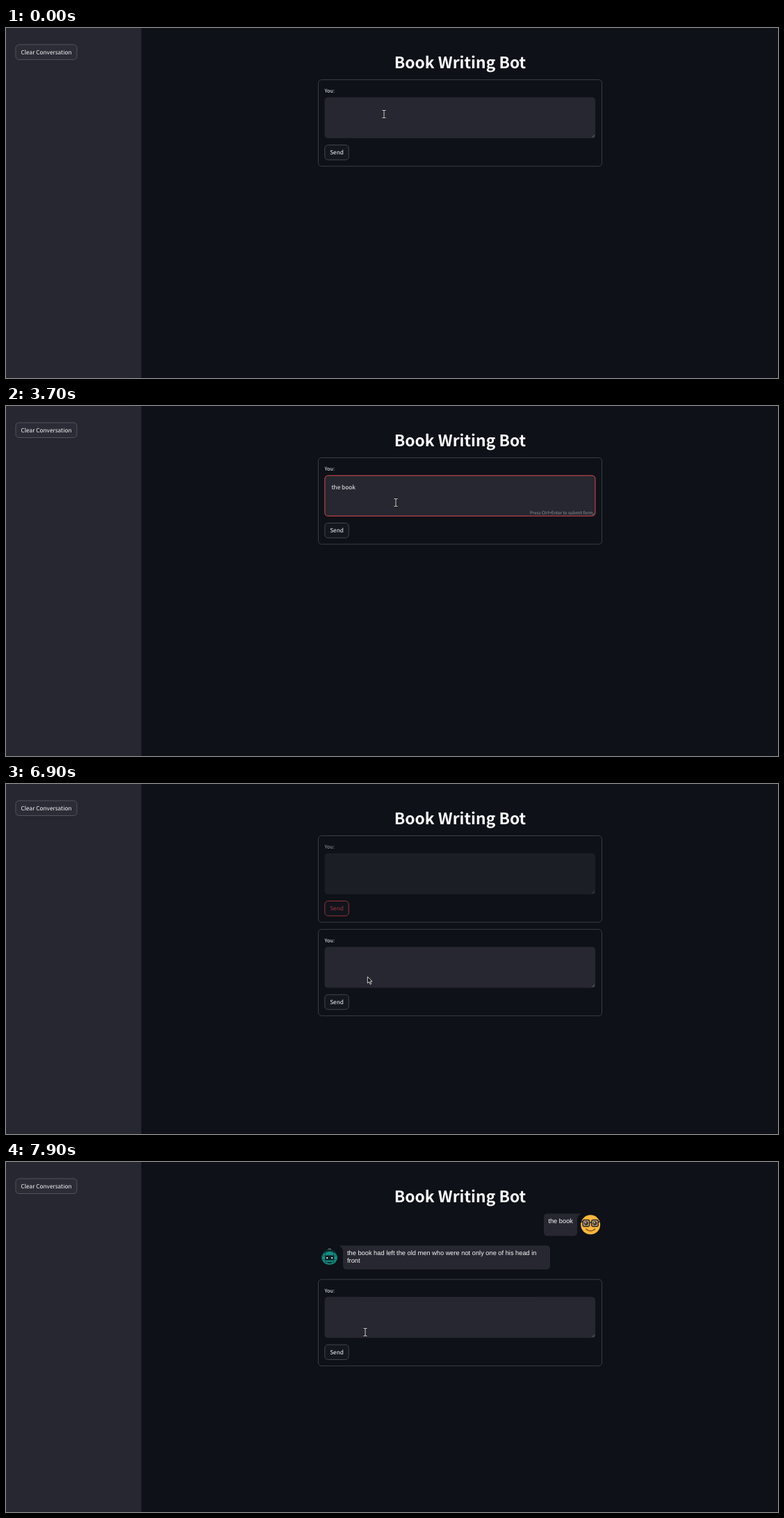
These frames come from a looping animation (1111x504 px, 8 s). An HTML page:

```html
<!DOCTYPE html>
<html lang="en">
<head>
<meta charset="utf-8">
<title>Book Writing Bot</title>
<style>
html, body { margin: 0; width: 100%; height: 100%; overflow: hidden; background: #0e1117; }
svg { display: block; width: 1111px; height: 504px; }
text { font: 8.29px "Noto Sans CJK JP", "Noto Sans CJK SC", "Noto Sans CJK", sans-serif; fill: #fafafa; text-rendering: geometricPrecision; }
.title { font-size: 22.8px; font-weight: 700; }
.label { font-size: 7.25px; }
.hint { font-size: 6.21px; fill: #97989d; }
.chat { font: 9.28px "Liberation Sans", Arial, sans-serif; }
</style>
</head>
<body>
<svg viewBox="0 0 1111 504">
  <rect width="1111" height="504" fill="#0e1117"/>
  <rect width="194.7" height="504" fill="#262730"/>
  <rect x="14" y="24" width="88" height="21.5" rx="4.6" fill="#2b2c36" stroke="#52535b"/>
  <text x="58" y="37.8" text-anchor="middle">Clear Conversation</text>
  <text class="title" x="653.5" y="58" text-anchor="middle">Book Writing Bot</text>
  <g id="scene"></g>
</svg>
<script>
const LOOP = 8000, STEP = 100, RED = '#d8474b', PANEL = '#262730';
const PHRASE = 'the book';
const keyTimes = [2100, 2200, 2300, 2400, 2600, 2700, 3000, 3100];
const caretToggles = [500, 1100, 1700, 3700, 4300, 5000, 5500, 5700];

// time, pointer shape, x, y; each entry holds until the next
const pointerPath = [
  [0, 'beam', 544, 124], [500, 'beam', 547, 127], [600, 'beam', 551, 130],
  [700, 'beam', 555, 133], [800, 'beam', 559, 137], [900, 'beam', 561, 139],
  [4300, 'beam', 530, 150], [4400, 'arrow', 446, 174], [4600, 'arrow', 444, 175],
  [4700, 'arrow', 447, 176], [4800, 'arrow', 452, 177], [5100, 'hand', 465, 176],
  [5200, 'hand', 474, 177], [5800, 'beam', 479, 260], [6000, 'beam', 492, 271],
  [6300, 'beam', 501, 273], [6400, 'beam', 512, 274], [6600, 'beam', 515, 274],
  [6700, 'beam', 518, 274], [6900, 'arrow', 520, 277], [7000, 'arrow', 521, 293],
  [7700, 'arrow', 520, 279], [7800, 'beam', 518, 251], [7900, 'beam', 517, 245]
];

const pointers = {
  beam: `<path id="b" d="M-2.5-5.5H-.8L0-4.8L.8-5.5H2.5M0-5V5M-2.5 5.5H-.8L0 4.8L.8 5.5H2.5" fill="none" stroke="#111" stroke-width="2.4"/>
    <path d="M-2.5-5.5H-.8L0-4.8L.8-5.5H2.5M0-5V5M-2.5 5.5H-.8L0 4.8L.8 5.5H2.5" fill="none" stroke="#e4e4e4"/>`,
  arrow: '<path d="M.3.6V9.8L2.5 7.8L4.1 11.4L5.7 10.7L4.2 7.2H7Z" fill="#0b0c10" stroke="#e8e8e8" stroke-width=".9"/>',
  hand: '<path d="M-1 6.5V1Q0-.5 1 1V4.5L4.5 5.3Q5.6 5.8 5.3 7.5L4.4 11H-.7L-3.6 7.2Q-3.5 5.6-1 7.5Z" fill="#0b0c10" stroke="#e8e8e8" stroke-width=".9"/>'
};

const passed = (times, t) => times.filter(x => x <= t).length;
const clamp = v => Math.max(0, Math.min(1, v));
const at = (x, y, body) => `<g transform="translate(${x} ${y})">${body}</g>`;
const box = (x, y, w, h, fill, stroke = 'none', extra = '') =>
  `<rect x="${x}" y="${y}" width="${w}" height="${h}" rx="4.6" fill="${fill}" stroke="${stroke}" ${extra}/>`;

const ruler = document.createElement('canvas').getContext('2d');
function textWidth(s) {
  ruler.font = '82.9px "Noto Sans CJK JP", "Noto Sans CJK SC", "Noto Sans CJK", sans-serif';
  return ruler.measureText(s).width / 10;
}

function form(dy, { text = '', focus = 0, caret = false, hot = false, labelFade = 1, sendFade = 1, fade = 1 } = {}) {
  const caretX = Math.floor(468.5 + textWidth(text)) + .5;
  return at(0, dy, `
    ${box(449.5, 74.5, 408, 124.5, 'none', '#3a3d43')}
    <text class="label" x="458.6" y="93.4" opacity="${labelFade}">You:</text>
    <g opacity="${fade}">
      ${box(458.5, 99.7, 389.7, 59, PANEL)}
      <path d="M843.5 157.5L847 154M845.7 157.5L847 156.2" stroke="#85868b" stroke-width=".7"/>
    </g>
    ${focus ? box(458.8, 100.2, 389.2, 58.2, 'none', RED, `opacity="${focus}"`) : ''}
    <text x="468.5" y="119.6">${text}</text>
    ${text ? '<text class="hint" x="844.5" y="156" text-anchor="end">Press Ctrl+Enter to submit form</text>' : ''}
    ${caret ? `<path d="M${caretX} 110.5V122" stroke="#e8e8e8"/>` : ''}
    <g opacity="${sendFade}">
      ${box(458.8, 168.5, 34.4, 21.4, '#131720', hot ? RED : '#42454b')}
      <text x="476" y="182.4" text-anchor="middle" ${hot ? 'style="fill:#f0494b"' : ''}>Send</text>
    </g>`);
}

const robot = `
  <circle r="3" cy="-8.8" fill="#8d9496"/><path d="M0-9V-4" stroke="#555c60" stroke-width="2"/>
  <circle r="11.4" cy=".7" fill="#0d2b2d"/>
  <path d="M-8-5Q0-10 8-5L11-1V4L8 9Q0 14-8 9L-11 4V-1Z" fill="#138b82"/>
  <path d="M-10.5-1H10.5M-10 4.5H10M-7 8H7M-6-6.5V9M6-6.5V9" stroke="#0c4f4e" stroke-width=".9"/>
  <rect x="-6.5" y="-1.7" width="13" height="7" rx="2.2" fill="#101f25"/>
  <path d="M-3.5.7V3M3.5.7V3" stroke="#d9f5f2" stroke-width="1.7"/>
  <path d="M-3 8.8H3" stroke="#0b2325" stroke-width="1.6"/>`;

const reader = `
  <circle r="14" fill="#fcb63c"/>
  <path d="M-7 6Q0 12 7 6" fill="none" stroke="#70461c" stroke-width="1.3"/>
  ${[-6.3, 6.3].map(x => `
    <rect x="${x - 4.7}" y="-6.7" width="9.4" height="9.2" rx="2" fill="#c9a878" stroke="#20242a" stroke-width="1.5"/>
    <circle cx="${x}" cy="-2" r="3" fill="#45362f"/><circle cx="${x - .8}" cy="-3" r=".9" fill="#fff"/>`).join('')}
  <path d="M-1.6-3H1.6M-13.5-4H-11M11-4H13.5" stroke="#20242a" stroke-width="1.5"/>`;

const botMessage = y => at(0, y, `
  ${at(465.6, 16, robot)}
  ${box(485, 0, 298, 34.5, PANEL)}
  <path d="M479 0H490V7H485Q484 2.5 479 0Z" fill="${PANEL}"/>
  <text class="chat" x="491" y="13.8">the book had left the old men who were not only one of his head in</text>
  <text class="chat" x="491" y="24.9">front</text>`);

const userMessage = at(0, 74.2, `
  ${box(774, 0, 48, 32.2, PANEL)}
  <path d="M828 0H817V7H822Q823 2.5 828 0Z" fill="${PANEL}"/>
  <text class="chat" x="780.4" y="14">${PHRASE}</text>
  ${at(841.2, 16.1, reader)}`);

function page(t) {
  if (t < 5700) return form(0, {
    text: PHRASE.slice(0, passed(keyTimes, t)),
    focus: clamp((t - 400) / 300),
    caret: passed(caretToggles, t) % 2 === 1,
    hot: t >= 5100
  });
  if (t < 7000) return form(0, {
    hot: true,
    labelFade: t < 6300 ? 1 : t < 6600 ? .93 : t < 6900 ? .8 : .6,
    sendFade: t < 6600 ? 1 : t < 6900 ? .85 : .65,
    fade: t < 6900 ? 1 : .62
  }) + form(134.8);
  if (t < 7200) return form(18.6);
  if (t < 7300) return botMessage(98) + form(72.6);
  return userMessage + botMessage(120.2) + form(94.6);
}

const scene = document.getElementById('scene');
let shown = -1;
function draw(now) {
  const t = Math.floor(now % LOOP / STEP) * STEP;
  if (t !== shown) {
    shown = t;
    const [, shape, x, y] = pointerPath[passed(pointerPath.map(p => p[0]), t) - 1];
    scene.innerHTML = page(t) + at(x, y, pointers[shape]);
  }
  requestAnimationFrame(draw);
}
draw(performance.now());
</script>
</body>
</html>
```
